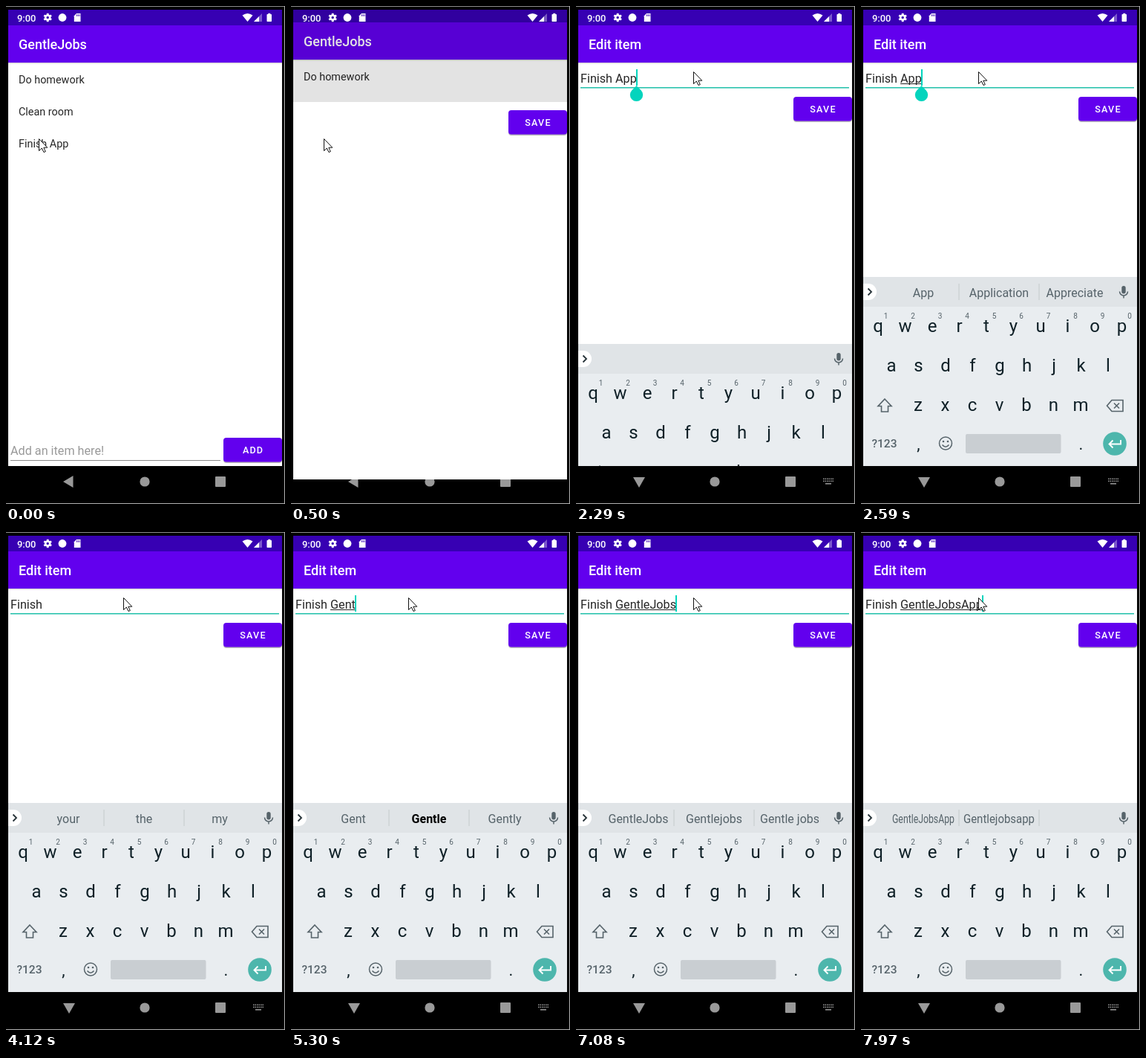
Recreate the animation shown at these times as an HTML page with a canvas. Size 376 by 669 pixels, loop 8000 ms.

```html
<!DOCTYPE html>
<html lang="en">
<head>
<meta charset="utf-8">
<title>To-do list</title>
<style>
html, body { margin: 0; width: 376px; height: 669px; overflow: hidden; background: #000; }
canvas { display: block; }
</style>
</head>
<body>
<canvas id="stage" width="376" height="669"></canvas>
<script>
const ctx = document.getElementById('stage').getContext('2d');
const LOOP = 8000;
const PURPLE = '#6200ee', TEAL = '#03d4bd', INK = '#262626', KEY = '#0f2027', SOFT = '#56636a', NAV = '#999';

// time, word being typed, middle and right suggestions ("*" marks the bold one)
const typing = [
  [0, 'App', 'Application', 'Appreciate'],
  [3020, 'Ap', 'App', 'Apple'],
  [3320, 'A', 'And', 'All'],
  [3590, '', 'the', 'my'],
  [4520, 'G', 'Go', 'Get'],
  [4820, 'Ge', 'Get', 'Gets'],
  [5090, 'Gen', 'General', 'Gene'],
  [5300, 'Gent', '*Gentle', 'Gently'],
  [5420, 'Gentl', '*Gentle', 'Gently'],
  [5570, 'Gentle', 'Gently', 'Gentler'],
  [6510, 'GentleJ', 'Gentlej', 'Gentleman'],
  [6630, 'GentleJo', 'Gentlejo', 'Gentle Jo'],
  [6930, 'GentleJob', 'Gentlejob', 'Gentle job'],
  [7080, 'GentleJobs', 'Gentlejobs', 'Gentle jobs'],
  [7510, 'GentleJobsA', 'Gentlejobsa', 'Gentle jobs'],
  [7820, 'GentleJobsAp', 'Gentlejobsap', 'Gentle jobs'],
  [7970, 'GentleJobsApp', 'Gentlejobsapp', '']
];
const pointer = [[0, 44, 178], [1230, 243, 143], [1380, 204, 118], [1530, 172, 97], [1650, 158, 88]];
// time, shift of the list, shift of the editor, top of the revealed part
const opening = [[500, -4, 18, 129], [620, -11, 3, 5], [740, -13, 1, 5], [860, 0, 0, 5]];
const caretOff = [[2740, 3020], [4120, 4520], [5980, 6510]];

const at = (steps, t) => steps.filter(s => s[0] <= t).pop();

function rect(x, y, w, h, color, r = 0) {
  ctx.fillStyle = color;
  ctx.beginPath();
  ctx.roundRect(x, y, w, h, r);
  ctx.fill();
}
function circle(x, y, r, color) {
  ctx.fillStyle = color;
  ctx.beginPath();
  ctx.arc(x, y, r, 0, 7);
  ctx.fill();
}
function shape(d, color) {
  ctx.fillStyle = color;
  ctx.fill(new Path2D(d));
}
function line(d, color, width = 1.6) {
  ctx.strokeStyle = color;
  ctx.lineWidth = width;
  ctx.stroke(new Path2D(d));
}
function setFont(size, weight = 400) {
  ctx.font = `${weight} ${size}px Roboto, "Open Sans", sans-serif`;
}
function text(s, x, y, size, color, weight = 400, align = 'left', spacing = 0) {
  setFont(size, weight);
  ctx.letterSpacing = spacing + 'px';
  ctx.textAlign = align;
  ctx.fillStyle = color;
  ctx.fillText(s, x, y);
  ctx.letterSpacing = '0px';
}
function layer(dy, top, bottom, draw) {
  ctx.save();
  ctx.beginPath();
  ctx.rect(3, top, 369, bottom - top);
  ctx.clip();
  ctx.translate(0, dy);
  draw();
  ctx.restore();
}

function page(title) {
  rect(3, 5, 369, 613, '#fff');
  rect(3, 76, 369, 1, '#d8d8d8');
  rect(3, 77, 369, 1, '#f0f0f0');
  rect(3, 5, 369, 21, '#3700b3');
  rect(3, 26, 369, 50, PURPLE);
  text(title, 17, 58, 18, '#fff', 500);
}
function button(label, y) {
  rect(293, y + 1, 79, 33, '#bbb', 4);
  rect(293, y, 79, 32.5, PURPLE, 4);
  text(label, 333, y + 21, 12.6, '#fff', 500, 'center', 1.12);
}
function list() {
  page('GentleJobs');
  ['Do homework', 'Clean room', 'Finish App'].forEach((s, i) => text(s, 17, 103.5 + i * 43, 14.4, INK));
  text('Add an item here!', 6, 603, 16.2, '#999');
  rect(6, 610, 283, 1, '#8a8a8a');
  button('ADD', 580);
}
function editor(t) {
  const word = at(typing, t)[1], focused = t >= 1890;
  page('Edit item');
  rect(6, 109, 362, focused ? 1.5 : 1, focused ? '#20c0aa' : '#8a8a8a');
  text('Finish ' + word, 6, 102.5, 16.2, INK);
  const start = 6 + ctx.measureText('Finish ').width;
  const end = 6 + ctx.measureText('Finish ' + word).width;
  if (t >= 2590) rect(start, 104, end - start, 1, INK);
  button('SAVE', 122);
  if (!focused) return;
  if (!caretOff.some(([a, b]) => t >= a && t < b)) rect(Math.round(end) - 1, 85, 2, 22, TEAL);
  if (t < 3020) {
    ctx.save();
    ctx.translate(81.5, 119.3);
    ctx.rotate(Math.PI / 4);
    rect(-8.7, -8.7, 17.4, 17.4, TEAL, [0, 8.7, 8.7, 8.7]);
    ctx.restore();
  }
}

// Long suggestions are condensed to the room in their cell
function suggestion(s, x, room) {
  const bold = s[0] === '*', label = s.replace('*', '');
  setFont(16, bold ? 700 : 400);
  ctx.save();
  ctx.translate(x, 390.5);
  ctx.scale(Math.min(1, room / (ctx.measureText(label).width || 1)), 1);
  text(label, 0, 0, 16, bold ? '#000' : SOFT, bold ? 700 : 400, 'center');
  ctx.restore();
}
function keyRow(keys, x, y) {
  [...keys].forEach((k, i) => text(k, x + i * 36.5, y, 24, KEY, 400, 'center'));
}
function keyboard(t) {
  rect(3, 364, 369, 254, '#e9edf0');
  rect(3, 364, 369, 40, '#e0e4e7');
  rect(3, 373, 18, 22, '#fff', [0, 11, 11, 0]);
  line('M9.5 379.5l4.5 4.5l-4.5 4.5', '#263238', 1.8);
  if (t >= 2590) {
    const [, left, middle, right] = at(typing, t);
    suggestion(left || 'your', 84, 84);
    suggestion(middle, 186, 96);
    suggestion(right, 288, 84);
    rect(131.5, 373, 1, 22, '#c3c9cc');
    rect(239.5, 373, 1, 22, '#c3c9cc');
  }
  rect(351.3, 376, 5.4, 10.5, SOFT, 2.7);
  line('M348.5 383.5a5.5 5.5 0 0 0 11 0M354 389v3.5', SOFT, 1.5);

  keyRow('qwertyuiop', 23, 438);
  [...'1234567890'].forEach((n, i) => text(n, 33.5 + i * 36.5, 420, 10, SOFT, 400, 'center'));
  keyRow('asdfghjkl', 41, 490.5);
  keyRow('zxcvbnm', 77, 544);
  line('M32 528l9 9.5h-4.5v7.5h-9v-7.5h-4.5z', SOFT);
  line('M338 529.5h15v15h-15l-6.5-7.5zM341 533.5l7 7m0-7l-7 7', SOFT);
  text('?123', 31.5, 593, 15.5, SOFT, 500, 'center');
  text(',', 77.5, 596, 22, KEY, 400, 'center');
  text('.', 296.5, 596, 22, KEY, 400, 'center');
  line('M105.5 587.5a8.5 8.5 0 1 0 17 0a8.5 8.5 0 1 0-17 0M109.5 589.5q4.5 5.5 9 0', SOFT, 1.5);
  circle(111, 585, 1.3, SOFT);
  circle(117, 585, 1.3, SOFT);
  rect(141, 575, 128.5, 26, '#c9ced2', 2);
  circle(342, 588, 15.8, '#4db6ac');
  line('M350 583v5.5h-15M339.5 583.5l-5 5l5 5', '#fff', 1.9);
}

function navBar(typingMode) {
  shape(typingMode ? 'M77 633h16l-8 14z' : 'M77 639l13.5-8v16z', NAV);
  circle(187, 639, 6.6, NAV);
  rect(282, 632, 14, 14, NAV, 1);
  if (!typingMode) return;
  for (let i = 0; i < 12; i++) rect(333 + i % 6 * 2.5, 634.5 + (i / 6 | 0) * 3, 1.5, 1.5, NAV);
  rect(336, 641, 8, 1.5, NAV);
}
function statusIcons() {
  const white = '#fff';
  text('9:00', 15, 20.5, 12.9, white, 500);
  line('M53.2 15.5a3 3 0 1 0 6 0a3 3 0 1 0-6 0', white, 2.6);
  for (let i = 0; i < 6; i++) {
    ctx.save();
    ctx.translate(56.2, 15.5);
    ctx.rotate(i * Math.PI / 3);
    rect(-1.4, -5.7, 2.8, 2.5, white);
    ctx.restore();
  }
  circle(76, 15.5, 5.4, white);
  shape('M95 10h5.5v11h-8.7v-7.8z', white);
  for (const x of [95, 96.8, 98.6]) rect(x, 11.3, 0.9, 2.4, '#3700b3');
  shape('M318.5 12.5q7-5 14 0l-7 8.5z', white);
  shape('M345 10v11h-11z', 'rgba(255,255,255,.35)');
  shape('M341 14v7h-7z', white);
  rect(351.5, 11, 6.5, 10, white, 0.8);
  rect(353.3, 9.8, 3, 1.5, white);
}
function arrow(x, y) {
  ctx.save();
  ctx.translate(x + 0.5, y + 0.5);
  const d = 'M0 0v16l3.8-3.5l2.7 5.5l2.3-1l-2.5-5.3h5z';
  shape(d, '#fff');
  line(d, '#111', 1);
  ctx.restore();
}

function draw(t) {
  rect(0, 0, 376, 669, '#000');
  rect(0, 0, 376, 1, '#8c8c8c');
  rect(375, 0, 1, 669, '#b0b0b0');
  rect(0, 668, 376, 1, '#b0b0b0');
  navBar(t >= 2290);
  const step = at(opening, t);
  if (!step) {
    layer(0, 5, 618, list);
  } else {
    const [, listShift, shift, top] = step;
    if (shift) {
      layer(listShift, 5, 618, list);
      rect(3, 5, 369, 613, 'rgba(0,0,0,.11)');
    }
    layer(shift, top, 636, () => editor(t));
  }
  if (t >= 2290) layer(t < 2440 ? 90 : 0, 364, 618, () => keyboard(t));
  statusIcons();
  arrow(...at(pointer, t).slice(1));
}

const begin = performance.now();
function tick() {
  draw((performance.now() - begin) % LOOP);
  requestAnimationFrame(tick);
}
tick();
</script>
</body>
</html>
```
